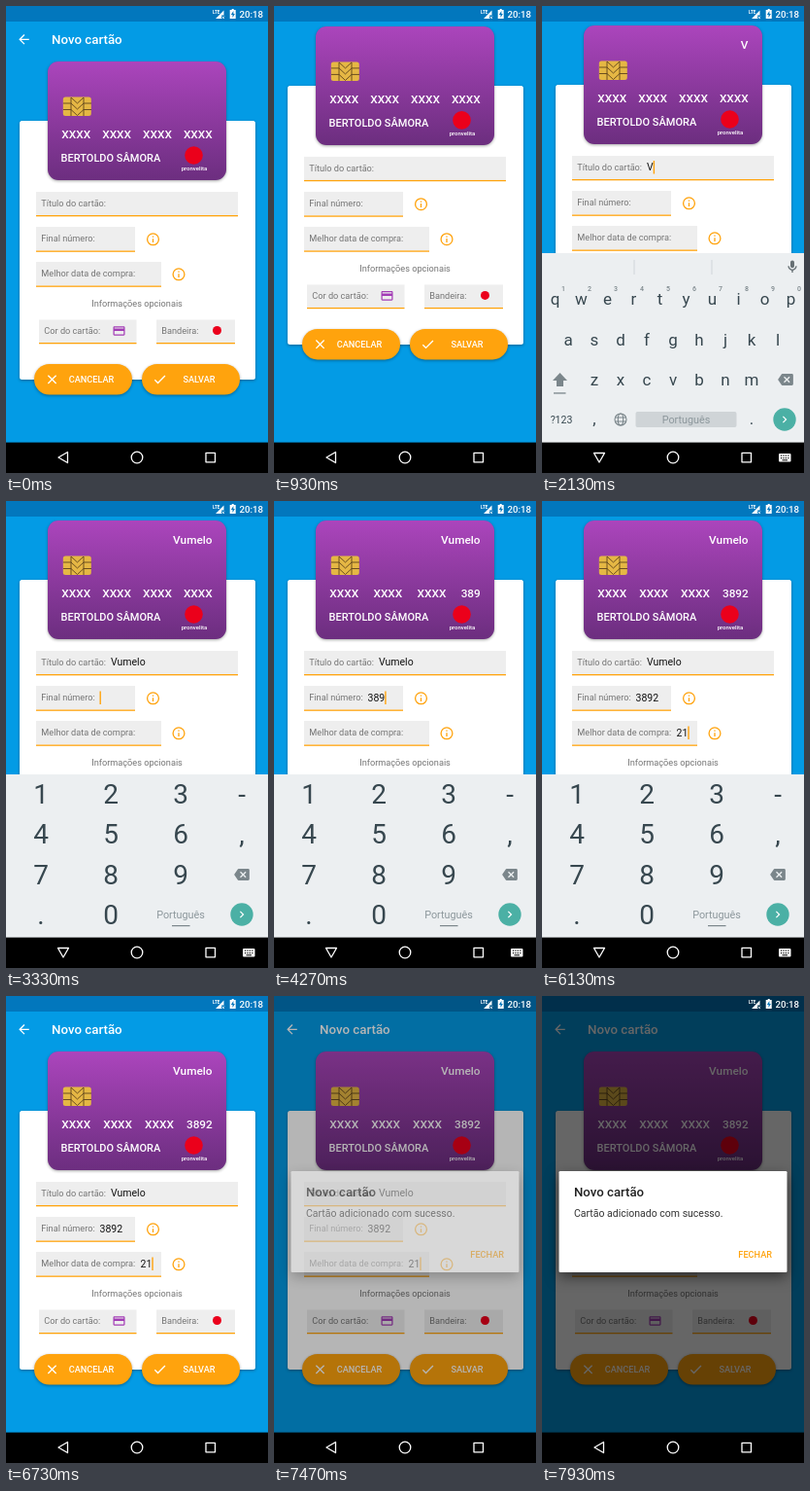
Recreate the animation shown at these times as an HTML page. Size 270 by 480 pixels, loop 8 s.

```html
<!DOCTYPE html>
<html lang="pt">
<head>
<meta charset="utf-8">
<title>Novo cartão</title>
<style>
  html, body { margin: 0; width: 100%; height: 100%; overflow: hidden; background: #000; }
  svg { display: block; width: 100vw; height: 100vh; font-family: Roboto, sans-serif; }
  .raised { filter: drop-shadow(0 1px 1.5px rgba(0, 0, 0, .35)); }
  .dialog { filter: drop-shadow(0 5px 7px rgba(0, 0, 0, .5)); }
</style>
</head>
<body>
<svg id="stage" viewBox="0 0 270 480"></svg>
<script>
const LOOP = 8000, SCROLL = 37, DP = .6565;
const ORANGE = '#ffa30d', INK = '#37474f', GREY = '#757575', KEY_GREY = '#7b868b';

// Each field: when it takes focus, what is typed, and when each key lands.
const entries = [
  { focus: 1400, word: 'Vumelo', keys: [1980, 2250, 2400, 2560, 2700, 2840], x: 108, y: 203 },
  { focus: 3130, word: '3892', keys: [3600, 3860, 4160, 4460], x: 96.5, y: 239.5 },
  { focus: 4930, word: '21', keys: [5540, 5880], x: 138.5, y: 275.5 },
];
const KEYBOARD_IN = 1450, KEYBOARD_OUT = 6200, SCROLL_BACK = 6300;

const PATHS = {
  back: 'M20 11H7.83l5.59-5.59L12 4l-8 8 8 8 1.41-1.41L7.83 13H20v-2z',
  close: 'M19 6.41L17.59 5 12 10.59 6.41 5 5 6.41 10.59 12 5 17.59 6.41 19 12 13.41 17.59 19 19 17.59 13.41 12z',
  check: 'M9 16.17L4.83 12l-1.42 1.41L9 19 21 7l-1.41-1.41z',
  card: 'M20 4H4c-1.11 0-2 .89-2 2v12c0 1.11.89 2 2 2h16c1.11 0 2-.89 2-2V6c0-1.11-.89-2-2-2zm0 14H4v-6h16v6zm0-10H4V6h16v2z',
  erase: 'M22 3H7c-.69 0-1.23.35-1.59.88L0 12l5.41 8.11c.36.53.9.89 1.59.89h15c1.1 0 2-.9 2-2V5c0-1.1-.9-2-2-2zm-3 12.59L17.59 17 14 13.41 10.41 17 9 15.59 12.59 12 9 8.41 10.41 7 14 10.59 17.59 7 19 8.41 15.41 12 19 15.59z',
  mic: 'M12 14c1.66 0 3-1.34 3-3V5c0-1.66-1.34-3-3-3S9 3.34 9 5v6c0 1.66 1.34 3 3 3zm5-3c0 2.76-2.24 5-5 5s-5-2.24-5-5H5c0 3.53 2.61 6.43 6 6.92V21h2v-3.08c3.39-.49 6-3.39 6-6.92h-2z',
  info: 'M11 17h2v-6h-2v6zm1-15a10 10 0 1 0 0 20 10 10 0 1 0 0-20zm0 18a8 8 0 1 1 0-16 8 8 0 1 1 0 16zM11 9h2V7h-2v2z',
  next: 'M10 6L8.59 7.41 13.17 12l-4.58 4.59L10 18l6-6z',
};

const rect = (x, y, w, h, fill, extra = '') =>
  `<rect x="${x}" y="${y}" width="${w}" height="${h}" fill="${fill}" ${extra}/>`;
const text = (str, x, y, size, fill, extra = '') =>
  `<text x="${x}" y="${y}" font-size="${size}" fill="${fill}" ${extra}>${str}</text>`;
const icon = (name, x, y, fill, scale = DP) =>
  `<path d="${PATHS[name]}" fill="${fill}" transform="translate(${x} ${y}) scale(${scale}) translate(-12 -12)"/>`;
const circle = (x, y, r, fill, extra = '') =>
  `<circle cx="${x}" cy="${y}" r="${r}" fill="${fill}" ${extra}/>`;
const MEDIUM = 'font-weight="500"', MIDDLE = 'text-anchor="middle"', END = 'text-anchor="end"';

const field = (label, x, y, w, h) =>
  rect(x, y, w, h, '#eee') + rect(x, y + h, w, 1.3, ORANGE) +
  text(label, x + 5.3, y + h / 2 + 3.2, 9.19, GREY);

const button = (label, x, iconName, labelX) =>
  rect(x, 368, 101, 31.5, ORANGE, 'rx="15.75" class="raised"') +
  icon(iconName, x + 18.5, 383.8, '#fff') +
  text(label, labelX, 387, 9.19, '#fff', `${MEDIUM} ${MIDDLE}`);

const nextKey = (x, y) => circle(x, y, 11.7, '#4bb0a5') + icon('next', x, y, '#fff', .6);

function form() {
  const chip = rect(58.8, 93.5, 29, 19.5, '#e5b744', 'rx="2.5"') +
    `<path d="M59 100h8l6.5 6 6.5-6h8M59 106.500h8l6.500 6 6.500-6h8M67 94v19M80 94v19M67 94l6.500 6 6.500-6"
      fill="none" stroke="#5f431c" stroke-width=".9"/>`;
  const numbers = Array(4).fill(text('XXXX', 0, 136, 11.82, '#fff', `${MEDIUM} class="digits"`)).join('');
  return icon('back', 18.5, 34.300, '#fff') +
    text('Novo cartão', 47, 39.2, 13.3, '#fff', MEDIUM) +
    rect(14, 118, 243, 266, '#fff', 'rx="2.5" class="raised"') +
    rect(43, 57, 184, 122, 'url(#purple)', 'rx="11" class="raised"') + chip + numbers +
    text('', 212.5, 81, 11.82, '#fff', `${MEDIUM} ${END} id="cardTitle"`) +
    text('BERTOLDO SÂMORA', 56.5, 160, 11, '#fff', MEDIUM) +
    circle(193.5, 153.5, 9.3, '#eb001b') +
    text('pronvelita', 194, 169, 6, '#fff', `${MEDIUM} ${MIDDLE}`) +
    field('Título do cartão:', 31, 191, 208, 24) +
    field('Final número:', 31, 227, 102, 24.5) +
    field('Melhor data de compra:', 31, 263, 129, 24.500) +
    icon('info', 151.5, 239.8, ORANGE) + icon('info', 178, 275.8, ORANGE) +
    text('Informações opcionais', 135, 309, 9.19, GREY, MIDDLE) +
    field('Cor do cartão:', 34, 322.5, 100.5, 23.5) + icon('card', 116.500, 334, '#a23bb5', .6) +
    field('Bandeira:', 155, 322.5, 81, 23.5) + circle(217.5, 333.5, 4.5, '#eb001b') +
    button('CANCELAR', 29, 'close', 88) + button('SALVAR', 140, 'check', 199) +
    entries.map(e => text('', e.x, e.y + 3.4, 10.5, '#111', 'class="value"')).join('') +
    rect(0, 0, 1.4, 13.5, ORANGE, 'id="cursor"');
}

function letterKeyboard() {
  const row = (keys, x, y) => [...keys].map((k, i) => text(k, x + 27 * i, y, 17, INK, MIDDLE)).join('');
  const hints = [...'1234567890'].map((d, i) =>
    text(d, 22 + 27 * i, 292.5, 7, KEY_GREY, `${MEDIUM} ${MIDDLE}`)).join('');
  const globe = `<g fill="none" stroke="${KEY_GREY}" stroke-width="1.1">
    <circle cx="81" cy="425" r="6"/><ellipse cx="81" cy="425" rx="2.7" ry="6"/>
    <path d="M75.500 423h11M75.500 427h11"/></g>`;
  return rect(0, 254, 270, 226, '#eceff1') +
    rect(94.5, 261, 1, 15, '#cfd6d9') + rect(174.5, 261, 1, 15, '#cfd6d9') +
    icon('mic', 258, 268, '#666f74') + hints +
    row('qwertyuiop', 13.5, 307) + row('asdfghjkl', 27, 348.5) + row('zxcvbnm', 54, 389.5) +
    `<path d="M18.500 377l7.500 8h-4v6h-7v-6h-4z" fill="${KEY_GREY}"/>` +
    rect(12, 397.3, 12.5, 1.3, KEY_GREY) + icon('erase', 251, 384, KEY_GREY) +
    text('?123', 20, 429, 10.5, INK, MIDDLE) + text(',', 54, 430, 17, INK, MIDDLE) + globe +
    rect(96.5, 417, 104, 16, '#cfd4d7', 'rx="2"') +
    text('Português', 148.5, 429, 10.8, '#8c979c', MIDDLE) +
    text('.', 216, 430, 17, INK, MIDDLE) + nextKey(250, 425);
}

function numberKeyboard() {
  const columns = [36, 108, 180, 243];
  const keys = ['123-', '456,', '789', '.0'].map((line, r) => [...line].map((k, c) =>
    text(k, columns[c], 311 + 41.3 * r, 28, INK, MIDDLE)).join('')).join('');
  return rect(0, 281, 270, 199, '#eceff1') + keys + icon('erase', 243, 384, KEY_GREY) +
    text('Português', 180, 428.5, 10.8, '#8c979c', MIDDLE) +
    rect(171, 436, 18.5, 1.2, KEY_GREY) + nextKey(243, 425);
}

function navBar() {
  const dots = [0, 1, 2, 3].map(i => rect(246 + i * 2.4, 461.5, 1.2, 1.2, '#000') +
    rect(246 + i * 2.4, 464, 1.2, 1.2, '#000')).join('');
  return rect(0, 448.6, 270, 31.4, '#000') +
    `<g fill="none" stroke="#fff" stroke-width="1.3" stroke-linejoin="round">
      <path id="backKey" d="M54 464l9.500-5.500v11z"/>
      <circle cx="135" cy="464" r="5.800"/><rect x="206" y="459.300" width="9.500" height="9.500"/></g>` +
    `<g id="keyboardKey">${rect(244, 460, 12.5, 8.5, '#fff', 'rx="1"')}${dots}${rect(247.5, 466.3, 5.5, 1, '#000')}</g>`;
}

const statusIcons = () =>
  text('LTE', 213, 7.5, 4.6, '#fff', 'font-weight="700"') +
  '<path d="M216 13l8.500-8.500v5h-2.500v3.500z" fill="#fff"/>' +
  '<path d="M222.500 10.500l2.500 2.500m0-2.500l-2.500 2.500" stroke="#fff" stroke-width=".8"/>' +
  '<path d="M230.700 4h2v-1h2v1h2v9h-6z" fill="#fff"/>' +
  '<path d="M234.400 5l-2.600 4h1.700v3l2.400-4h-1.500z" fill="#0277bd"/>' +
  text('20:18', 265, 11.7, 9.7, '#fff', `${MEDIUM} ${END}`);

const dialog = () => rect(17.5, 180, 235, 104, '#fff', 'rx="1.3" class="dialog"') +
  text('Novo cartão', 33, 206, 13.2, '#212121', MEDIUM) +
  text('Cartão adicionado com sucesso.', 33, 226.7, 10.5, '#333') +
  text('FECHAR', 237, 269, 9.19, ORANGE, `${MEDIUM} ${END}`);

const stage = document.getElementById('stage');
stage.innerHTML = `<defs><linearGradient id="purple" x2="0" y2="1">
    <stop stop-color="#ab45bc"/><stop offset="1" stop-color="#6c2e7f"/></linearGradient></defs>
  ${rect(0, 0, 270, 480, '#039be5')}
  <g id="form">${form()}</g>
  ${rect(0, 0, 270, 16, '#0277bd')}
  <g id="letters">${letterKeyboard()}</g><g id="numbers">${numberKeyboard()}</g>
  ${rect(0, 0, 270, 480, '#000', 'id="dim"')}
  <g id="dialog">${dialog()}</g>
  ${navBar()}${statusIcons()}`;

const $ = id => document.getElementById(id);
const digits = [...document.querySelectorAll('.digits')];
const values = [...document.querySelectorAll('.value')];

const progress = (t, start, end) => Math.min(1, Math.max(0, (t - start) / (end - start)));
const easeOut = p => 1 - (1 - p) ** 2;
const show = (el, on) => el.setAttribute('visibility', on ? 'visible' : 'hidden');
const move = (el, y) => el.setAttribute('transform', `translate(0 ${y})`);

// Spreads the four number groups evenly over the card's width.
function layoutDigits(last) {
  digits[3].textContent = last || 'XXXX';
  const widths = digits.map(d => d.getComputedTextLength());
  const gap = (155.5 - widths.reduce((a, b) => a + b)) / 3;
  let x = 57.3;
  digits.forEach((d, i) => { d.setAttribute('x', x); x += widths[i] + gap; });
}

function placeCursor(t) {
  const index = entries.findLastIndex(e => t >= e.focus);
  if (index < 0) return show($('cursor'), false);
  const { focus, keys, x, y } = entries[index];
  const lastChange = Math.max(...[focus, ...keys, SCROLL_BACK].filter(time => time <= t));
  $('cursor').setAttribute('x', x + values[index].getComputedTextLength());
  $('cursor').setAttribute('y', y - 7);
  show($('cursor'), (t - lastChange) % 1000 < 500);
}

function render(t) {
  const scrolled = easeOut(progress(t, 560, 1000)) - easeOut(progress(t, SCROLL_BACK, 6550));
  move($('form'), -SCROLL * scrolled);

  const typed = entries.map(e => e.word.slice(0, e.keys.filter(time => time <= t).length));
  typed.forEach((word, i) => { values[i].textContent = word; });
  $('cardTitle').textContent = typed[0];
  layoutDigits(typed[1]);
  placeCursor(t);

  const numeric = t >= entries[1].focus;
  show($('letters'), t >= KEYBOARD_IN && !numeric);
  show($('numbers'), numeric && t < KEYBOARD_OUT + 150);
  move($('letters'), 196 * (1 - easeOut(progress(t, KEYBOARD_IN, KEYBOARD_IN + 200))));
  move($('numbers'), 170 * progress(t, KEYBOARD_OUT, KEYBOARD_OUT + 150) ** 2);

  const open = t >= KEYBOARD_IN && t < KEYBOARD_OUT;
  $('backKey').setAttribute('transform', open ? 'rotate(-90 59 464)' : '');
  show($('keyboardKey'), open);

  const alert = progress(t, 7350, 7600);
  $('dim').setAttribute('opacity', .6 * alert);
  $('dialog').setAttribute('opacity', alert);
}

function tick() {
  render(performance.now() % LOOP);
  requestAnimationFrame(tick);
}
tick();
</script>
</body>
</html>
```
